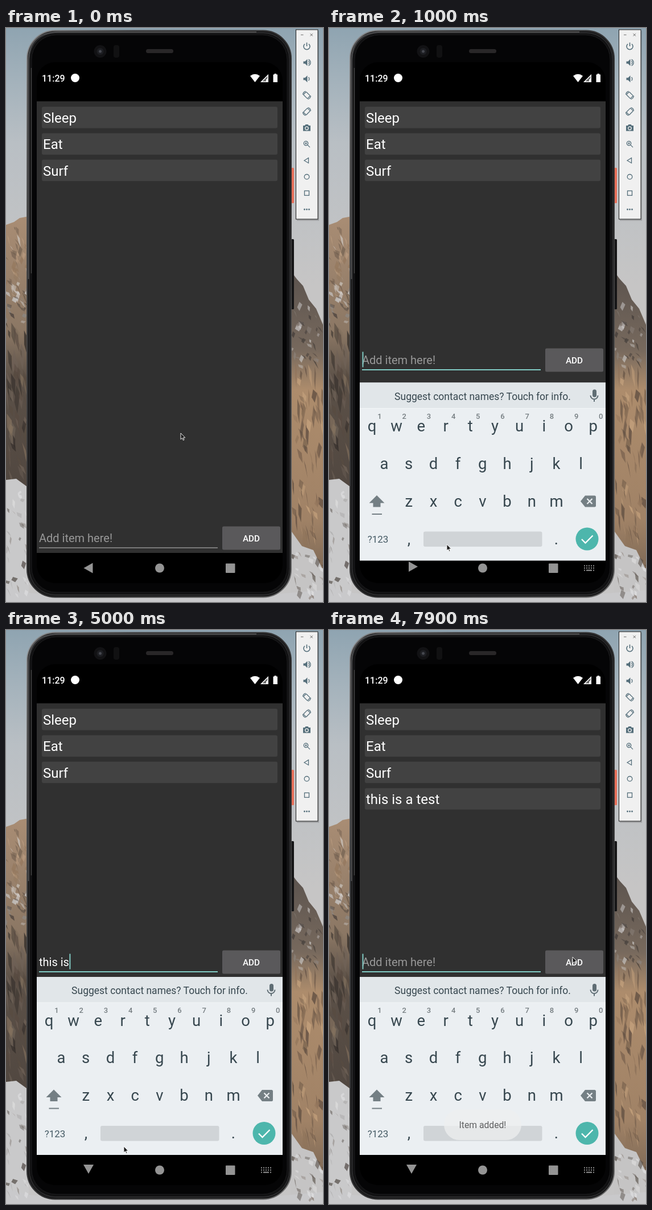
Animation, 557 px wide and 1006 px high, one loop 8 s. Source, as an HTML page:

```html
<!DOCTYPE html>
<html lang="en">
<head>
<meta charset="utf-8">
<title>To-do list demo</title>
<style>
  html, body { margin: 0; width: 100%; height: 100%; overflow: hidden; background: #b9bdc1; }
  svg { display: block; width: 100%; height: 100%; }
  text { font-family: Roboto, sans-serif; white-space: pre; }
  .item { font-size: 24px; fill: #fff; }
  .key { font-size: 27.5px; fill: #37474f; text-anchor: middle; }
  .hint { font-size: 13px; font-weight: 500; fill: #757d81; text-anchor: middle; }
  .word { font-size: 20px; fill: #7f898e; text-anchor: middle; }
  .tool { fill: none; stroke: #546e7a; stroke-width: 1.3; }
  .tool .solid { fill: #546e7a; stroke: none; }
</style>
</head>
<body>
<svg viewBox="0 0 557 1006" preserveAspectRatio="none">
  <defs>
    <linearGradient id="sky" x2="0" y2="1">
      <stop offset="0" stop-color="#8fa4b1"/><stop offset=".1" stop-color="#a5b3bc"/>
      <stop offset=".2" stop-color="#b9bfc4"/><stop offset=".45" stop-color="#c6c5c5"/>
    </linearGradient>
    <linearGradient id="leftRock" x2="0" y2="1">
      <stop offset="0" stop-color="#a98d74"/><stop offset=".3" stop-color="#8b7764"/>
      <stop offset=".42" stop-color="#5c5148"/><stop offset="1" stop-color="#453d38"/>
    </linearGradient>
    <linearGradient id="rightRock" x2="0" y2="1">
      <stop offset="0" stop-color="#5b534e"/><stop offset=".24" stop-color="#77695d"/>
      <stop offset=".36" stop-color="#ad8c6c"/><stop offset=".75" stop-color="#a08266"/>
      <stop offset="1" stop-color="#6a5a4c"/>
    </linearGradient>
    <linearGradient id="rim" x2="1" y2="1">
      <stop offset="0" stop-color="#8b8b8c"/><stop offset=".2" stop-color="#4a4a4b"/>
      <stop offset=".6" stop-color="#2f2f30"/><stop offset="1" stop-color="#6a6a6a"/>
    </linearGradient>
    <clipPath id="screen"><rect x="54" y="60" width="432" height="913" rx="32"/></clipPath>
  </defs>

  <rect width="557" height="1006" fill="url(#sky)"/>
  <path d="M0 345L14 340 24 333 40 330V1006H0Z" fill="url(#leftRock)"/>
  <path d="M500 425L511 440 522 452 532 476 545 492 557 520V1006H500Z" fill="url(#rightRock)"/>
  <g id="texture"></g>
  <path d="M0 792L18 790 40 806V1006H0Z" fill="#c9c9ca"/>
  <path d="M500 880L520 908 540 915 557 950V1006H500Z" fill="#c5c4c4"/>
  <path d="M0 1006V978L40 990 150 1000 430 996 557 985V1006Z" fill="#c9c9cb"/>
  <g id="snowTexture"></g>

  <!-- phone body -->
  <rect x="501" y="245" width="5" height="62" rx="1.5" fill="#e8705a"/>
  <rect x="501" y="370" width="5" height="123" rx="1.5" fill="#161617"/>
  <rect x="37" y="4.500" width="464" height="993" rx="49" fill="#1b1b1c" stroke="url(#rim)" stroke-width="2"/>
  <rect x="41" y="8.500" width="457" height="985" rx="46" fill="#111112" stroke="#39393b"/>
  <rect x="45" y="12" width="449" height="977" rx="43" fill="#050506" stroke="#1d1d1f"/>
  <path d="M39.500 440V58Q40 8 92 7H440" fill="none" stroke="#747475" stroke-width="1.500" opacity=".7"/>
  <path d="M44.500 430V70" stroke="#6d6d6e" stroke-width="1.200" opacity=".6"/>
  <circle cx="165.500" cy="41" r="11" fill="#121214"/>
  <circle cx="165.500" cy="41" r="6" fill="#1d1e22"/>
  <circle cx="165.500" cy="41" r="2.500" fill="#45474e"/>
  <rect x="189" y="30" width="10" height="22" rx="4" fill="#111112"/>
  <rect x="246" y="37" width="48" height="7" rx="3.500" fill="#292728"/>

  <g clip-path="url(#screen)">
    <rect x="54" y="60" width="432" height="913" fill="#000"/>
    <rect x="54" y="128.500" width="432" height="791.500" fill="#303030"/>
    <g fill="#fff">
      <text x="63" y="93.500" font-size="16" font-weight="500">11:29</text>
      <circle cx="121.500" cy="87.500" r="7.500"/>
      <path d="M429 84Q437.500 77.500 446 84L437.500 95Z"/>
      <path d="M461 81V95H447Z" opacity=".4"/>
      <path d="M461 81V95H447ZM457 90.500 459.500 88V84.500L450.500 93.500H457Z" fill-rule="evenodd"/>
      <path d="M471.500 80H475V81.500H477V95H469.500V81.500H471.500Z"/>
    </g>
    <g id="items"></g>

    <g id="entry">
      <text id="typed" x="58" y="900.500" font-size="20"></text>
      <line id="compose" y1="902.500" y2="902.500" stroke="#eee"/>
      <rect id="underline" x="58" width="314"/>
      <rect id="caret" y="879.500" width="2" height="27" fill="#80cbc4"/>
      <rect id="button" x="380" y="873.500" width="102" height="41" rx="2.500"/>
      <text x="431" y="899.500" font-size="15.300" font-weight="500" fill="#fff" text-anchor="middle">ADD</text>
    </g>

    <g id="keyboard">
      <rect x="54" y="608" width="432" height="312" fill="#ebeff2"/>
      <rect x="54" y="608" width="432" height="45" fill="#e1e6e9"/>
      <path d="M54 653H486" stroke="#f2f5f7"/>
      <text id="message" x="270" y="638" font-size="17.500" fill="#37474f" text-anchor="middle">Suggest contact names? Touch for info.</text>
      <g id="words">
        <path d="M206.500 618V643M333.500 618V643" stroke="#cdd3d6"/>
        <text class="word" x="150" y="639"></text>
        <text class="word" x="270" y="639" style="fill:#455a64;font-weight:700"></text>
        <text class="word" x="390" y="639"></text>
        <g fill="#455a64"><circle cx="263.500" cy="649" r="1.800"/><circle cx="269.500" cy="649" r="1.800"/><circle cx="275.500" cy="649" r="1.800"/></g>
      </g>
      <g fill="#5f6d74">
        <rect x="463" y="620" width="7" height="13.500" rx="3.500"/>
        <path d="M459.500 630.500a6.500 6.500 0 0 0 13 0M466 637V641.500" fill="none" stroke="#5f6d74" stroke-width="2"/>
      </g>
      <g id="keys"></g>
      <path d="M84 805.500L97.500 819H90.500V826H77.500V819H70.500Z" fill="#747f84"/>
      <path d="M75.500 838.500H93" stroke="#747f84" stroke-width="2"/>
      <path d="M450 806H466.500Q469 806 469 808.500V823.500Q469 826 466.500 826H450L442 816Z" fill="#747f84"/>
      <path d="M453.500 811.500l9 9m0-9l-9 9" stroke="#ebeff2" stroke-width="2.200"/>
      <text x="86" y="888.500" font-size="17" fill="#455a64" text-anchor="middle">?123</text>
      <rect x="166" y="869" width="208.500" height="26.500" rx="3" fill="#d0d4d7"/>
      <circle cx="453.500" cy="882" r="20" fill="#4db6ac"/>
      <path d="M444 882.500L450.500 889 463.500 876" fill="none" stroke="#fff" stroke-width="2.300"/>
    </g>

    <g id="toast">
      <rect x="202" y="840" width="136" height="54" rx="27" fill="#eeeff0"/>
      <text x="270" y="873" font-size="15.700" fill="#333" text-anchor="middle">Item added!</text>
    </g>

    <g fill="#949494">
      <path id="back" d="M-8 0L8-9V9Z"/>
      <circle cx="270" cy="946.500" r="8"/>
      <rect x="386" y="938.500" width="16.500" height="16.500" rx="1"/>
      <g id="imeIcon" fill="none" stroke="#949494" stroke-width="2">
        <path d="M448 942.500H466M448 946.500H466" stroke-dasharray="2 2"/>
        <path d="M448 950.500H466" stroke-dasharray="2 2 10 2"/>
      </g>
    </g>
  </g>

  <!-- emulator toolbar -->
  <rect x="511" y="5" width="39" height="333" fill="#000" opacity=".15"/>
  <rect x="509.500" y="3" width="38.500" height="332" fill="#f0f0f0" stroke="#1c1c1c"/>
  <path d="M518 12H522.500M534.500 9.800l4.400 4.400m0-4.400l-4.400 4.400" stroke="#666"/>
  <g id="tools"></g>

  <path id="pointer" d="M0 0V11L2.600 8.600 4.300 12.500 6 11.800 4.300 8H7.700Z" fill="#1b1b1b" stroke="#fff" stroke-width=".9"/>
</svg>
<script>
const $ = id => document.getElementById(id);
const NS = 'http://www.w3.org/2000/svg';

function add(parent, tag, attrs, text = '') {
  const el = parent.appendChild(document.createElementNS(NS, tag));
  for (const name in attrs) el.setAttribute(name, attrs[name]);
  el.textContent = text;
  return el;
}
const set = (id, attrs) => { for (const name in attrs) $(id).setAttribute(name, attrs[name]); };
const show = (id, on) => { $(id).style.display = on ? '' : 'none'; };

// Seeded slivers of rock and snow
let seed = 11;
const rand = () => (seed = seed * 16807 % 2147483647) / 2147483647;
function slivers(group, count, x0, x1, y0, y1, colors, tall) {
  for (let i = 0; i < count; i++) {
    const x = x0 + rand() * (x1 - x0), y = y0 + rand() * (y1 - y0);
    const w = 2 + rand() * 7, h = tall * (.4 + rand()), lean = (rand() - .5) * 10;
    add($(group), 'path', {
      d: `M${x} ${y}l${w} ${h * .3} ${lean} ${h * .7} ${-w * .8} ${-h * .4}z`,
      fill: colors[Math.floor(rand() * colors.length)], opacity: .4 + rand() * .4
    });
  }
}
slivers('texture', 45, -3, 36, 348, 465, ['#c0a184', '#6f5d4e', '#d0cbc7', '#94785e'], 16);
slivers('texture', 25, -3, 36, 455, 515, ['#c9c8c8', '#8d8782', '#4b423c'], 10);
slivers('texture', 50, -3, 36, 515, 775, ['#332d2a', '#6f6258', '#584b41', '#84725f'], 36);
slivers('texture', 35, 502, 552, 480, 590, ['#cac8c7', '#3f3936', '#8d847d'], 12);
slivers('texture', 65, 502, 556, 580, 880, ['#c5a27d', '#7a634f', '#8f7259', '#5c4b3f'], 32);
slivers('snowTexture', 28, -3, 36, 800, 990, ['#5a534e', '#e0e0e1', '#918a85', '#aeadad'], 13);
slivers('snowTexture', 28, 502, 556, 905, 995, ['#564d46', '#dededf', '#8b8079'], 13);

// List rows
['Sleep', 'Eat', 'Surf', 'this is a test'].forEach((label, i) => {
  const row = add($('items'), 'g', { transform: `translate(63 ${138 + i * 46.4})` });
  add(row, 'rect', { width: 414, height: 37.5, rx: 3, fill: '#424242' });
  add(row, 'text', { x: 2, y: 28, class: 'item' }, label);
});
const newRow = $('items').lastChild;

// Keyboard letters
[['qwertyuiop', 75.5, 693.5], ['asdfghjkl', 97, 759], ['zxcvbnm', 140.3, 825]].forEach(([letters, x, y], row) =>
  [...letters].forEach((letter, i) => {
    add($('keys'), 'text', { x: x + i * 43.2, y, class: 'key' }, letter);
    if (!row) add($('keys'), 'text', { x: 89 + i * 43.2, y: 671, class: 'hint' }, (i + 1) % 10);
  }));
add($('keys'), 'text', { x: 140.5, y: 891, class: 'key' }, ',');
add($('keys'), 'text', { x: 399.5, y: 891, class: 'key' }, '.');

// Toolbar icons, each drawn around its own centre; capital S marks a filled part
const speaker = '<path class="solid" d="M-6-2h3l4-4v12l-4-4h-3z"/>';
const tilted = '<rect x="-3.500" y="-5" width="7" height="10" rx="1" transform="rotate(-45)"/>';
[
  '<path d="M-3.500-4a5.500 5.500 0 1 0 7 0M0-6.500V0" stroke-width="1.600"/>',
  speaker + '<path d="M3-3a4 4 0 0 1 0 6M3-5.500a6 6 0 0 1 0 11"/>',
  speaker + '<path d="M3-3a4 4 0 0 1 0 6"/>',
  tilted + '<path d="M-7-1a7 7 0 0 1 5-6M7 1a7 7 0 0 1-5 6"/>',
  `<g transform="scale(-1 1)">${tilted}<path d="M-7-1a7 7 0 0 1 5-6M7 1a7 7 0 0 1-5 6"/></g>`,
  '<path class="solid" d="M-6.500-4h3l1.500-2h4l1.500 2h3v9.500h-13z"/><circle cy=".7" r="2.800" stroke="#f0f0f0"/>',
  '<circle cx="-1.500" cy="-1.500" r="3.700"/><path d="M1.300 1.300l4.200 4.200M-3.300-1.500h3.600M-1.500-3.300v3.600"/>',
  '<path d="M-4.500 0L3-4.500v9z"/>',
  '<circle r="4.300"/>',
  '<rect x="-4" y="-4" width="8" height="8"/>',
  '<g class="solid"><circle cx="-4" r="1.400"/><circle r="1.400"/><circle cx="4" r="1.400"/></g>'
].forEach((icon, i) => {
  add($('tools'), 'g', { class: 'tool', transform: `translate(528.5 ${32 + i * 28.6})` }).innerHTML = icon;
});

// Timelines: each row starts with its time in ms
const pointerPath = [[0, 307, 710], [100, 301, 722], [300, 260, 805], [500, 212, 893], [600, 207, 905],
  [6600, 207, 905], [6700, 230, 899], [6800, 316, 876], [6900, 425, 832], [7000, 505, 769], [7100, 535, 655], [7200, 428, 573]];
const keyboardPath = [[700, 300, 0], [800, 270, .15], [900, 155, .52], [1000, 13.5, 1], [1100, 3.5, 1], [1200, .8, 1], [1300, 0, 1]];
const backPath = [[900, 144.5, 946.5, 0], [1000, 148, 944, 180], [1100, 147, 944, 238], [1200, 146, 945, 262], [1300, 145, 945, 270]];
const typing = [
  [0, ''], [4100, 't', 'to the that'], [4200, 'th', 'that the this'], [4400, 'thi', 'thin this third'],
  [4600, 'this', 'thus this these'], [4700, 'this '], [4900, 'this i', 'I is it'], [5000, 'this is'], [5100, 'this is '],
  [5300, 'this is a', 'an a at'], [5600, 'this is a '], [5700, 'this is a t'], [5800, 'this is a t', 'to the that'],
  [5900, 'this is a te', 'to the that'], [6000, 'this is a te', 'tea te ten'], [6100, 'this is a tes', 'tea te ten'],
  [6200, 'this is a tes', 'yes test tea'], [6300, 'this is a test', 'yes test tea'], [6400, 'this is a test', 'rest test tests'],
  [7500, '']
];
const caretFlips = [700, 1300, 1800, 2300, 3100, 3400, 3900, 6900, 7400];

const latest = (rows, t) => rows.filter(row => row[0] <= t).pop();
function between(rows, t) {
  const next = rows.findIndex(row => row[0] > t);
  if (next < 0) return rows.at(-1);
  if (next === 0) return rows[0];
  const a = rows[next - 1], b = rows[next], k = (t - a[0]) / (b[0] - a[0]);
  return a.map((v, i) => v + (b[i] - v) * k);
}

const pen = document.createElement('canvas').getContext('2d');
pen.font = '20px Roboto, sans-serif';
const width = text => pen.measureText(text).width;

function draw(t) {
  const focused = t >= 700, raised = t >= 800;
  const [, text, words] = latest(typing, t);

  set('entry', { transform: `translate(0 ${raised ? -312 : 0})` });
  set('underline', focused ? { y: 910, height: 2, fill: '#80cbc4' } : { y: 910.5, height: 1, fill: '#c1c1c1' });
  $('typed').textContent = text || 'Add item here!';
  set('typed', { fill: text ? '#fff' : '#989898' });

  const composing = text && words;
  show('compose', composing);
  if (composing) set('compose', { x1: 58 + width(text.slice(0, text.lastIndexOf(' ') + 1)), x2: 58 + width(text) });

  show('caret', caretFlips.filter(time => time <= t).length % 2);
  set('caret', { x: 58.5 + width(text) });

  const ripple = t >= 7400 && t < 7800 ? (7800 - t) / 400 : 0;
  const shade = 90 + Math.round(ripple * 28);
  set('button', { fill: `rgb(${shade},${shade - 1},${shade + 1})` });

  const [, drop, alpha] = between(keyboardPath, t);
  set('keyboard', { transform: `translate(0 ${drop})`, opacity: alpha });
  show('message', !words);
  show('words', words);
  if (words) $('words').querySelectorAll('text').forEach((el, i) => { el.textContent = words.split(' ')[i]; });

  const [, bx, by, turn] = between(backPath, t);
  set('back', { transform: `translate(${bx} ${by}) rotate(${turn})` });
  show('imeIcon', t >= 900);

  newRow.style.display = t >= 7500 ? '' : 'none';
  set('toast', { opacity: Math.max(0, Math.min(.75, (t - 7500) / 400 * .75)) });

  const [, px, py] = between(pointerPath, t);
  set('pointer', { transform: `translate(${px} ${py})` });
}

const start = performance.now();
function tick() {
  const t = (performance.now() - start) % 8000;
  draw(Math.floor(t / 100) * 100);
  requestAnimationFrame(tick);
}
tick();
</script>
</body>
</html>
```
